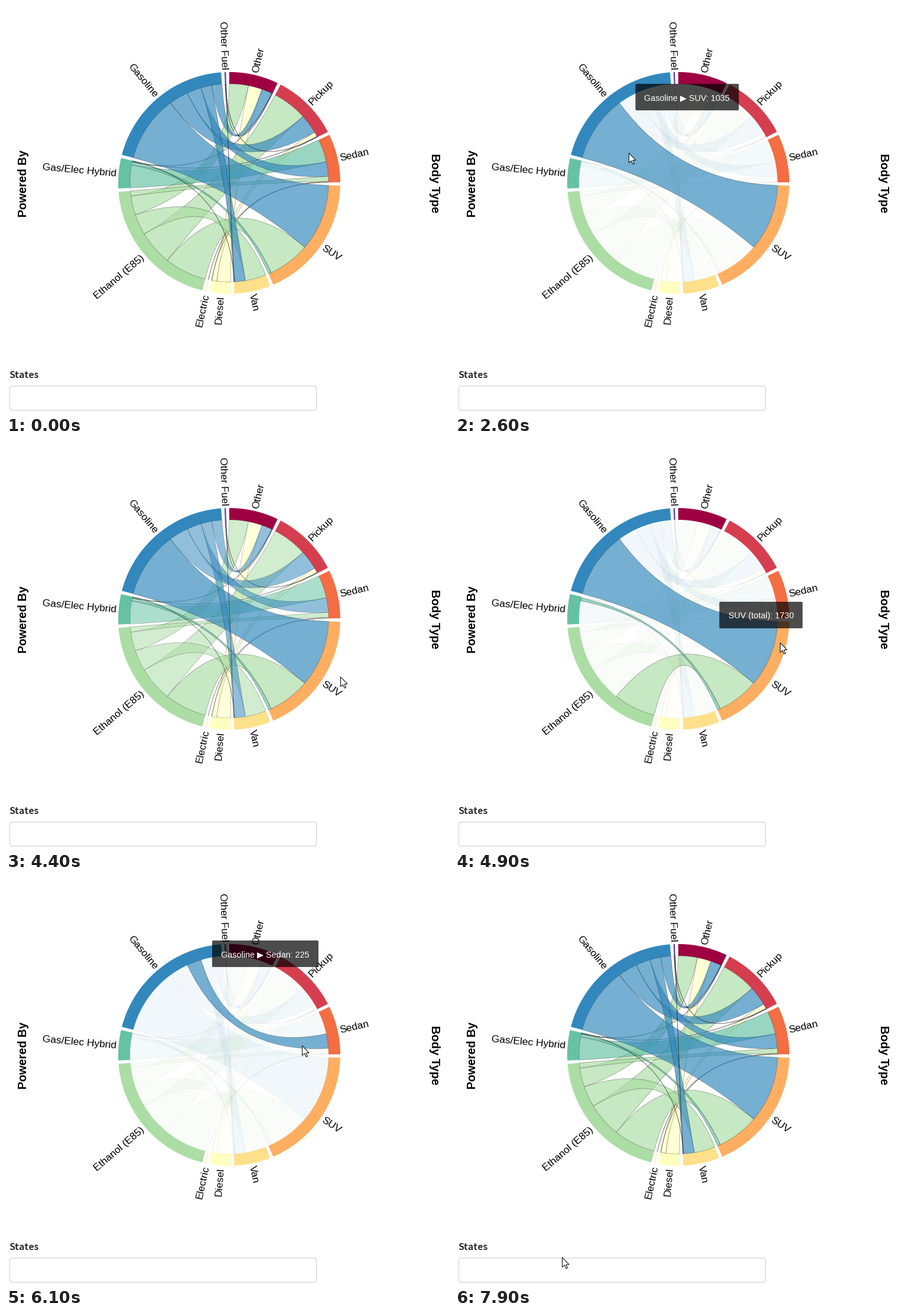
Animation of 750 by 692 pixels, one loop 8000 ms. Source, as a matplotlib script:

```python
from itertools import product

import numpy as np
import matplotlib.pyplot as plt
from matplotlib.animation import FuncAnimation
from matplotlib.patches import FancyBboxPatch, PathPatch, Polygon
from matplotlib.path import Path

WIDTH, HEIGHT, DPI = 750, 692, 64
PT = 72 / DPI  # points per pixel
FRAMES, STEP = 80, 100
CENTER = np.array([378, 300])
INNER, OUTER, LABEL_RADIUS = 168, 188, 192
PAD = 0.03
FADED, FADE_MS = 0.1, 250
SANS = ["Liberation Sans", "DejaVu Sans"]

BODIES = ["Other", "Pickup", "Sedan", "SUV", "Van"]
DIESEL, ELECTRIC, ETHANOL, HYBRID, GASOLINE, OTHER_FUEL = FUELS = [
    "Diesel", "Electric", "Ethanol (E85)", "Gas/Elec Hybrid", "Gasoline",
    "Other Fuel"]
NAMES = BODIES + FUELS
COLORS = dict(zip(NAMES, [
    "#9e0142", "#d53e4f", "#f46d43", "#fdae61", "#fee08b", "#ffffbf",
    "#fce38f", "#abdda4", "#66c2a5", "#3288bd", "#5e4fa2"]))

# Main flows per body; rare combinations share one small count.
MAIN = {
    "Other": {DIESEL: 215, ETHANOL: 295, GASOLINE: 160},
    "Pickup": {DIESEL: 75, ETHANOL: 540, GASOLINE: 300},
    "Sedan": {ETHANOL: 80, HYBRID: 355, GASOLINE: 225},
    "SUV": {ETHANOL: 650, HYBRID: 45, GASOLINE: 1035},
    "Van": {ETHANOL: 325, GASOLINE: 165},
}
RARE = {*product((HYBRID, OTHER_FUEL), ("Other", "Pickup", "Van")),
        *product((DIESEL, ELECTRIC), ("Sedan",))}
RARE_COUNT = 7

FLOWS = {}
for body, fuel in product(BODIES, FUELS):
    count = MAIN[body].get(fuel, RARE_COUNT if (fuel, body) in RARE else 0)
    if count:
        FLOWS[fuel, body] = count
TOTALS = {name: sum(n for pair, n in FLOWS.items() if name in pair)
          for name in NAMES}

# time, hovered group or chord, tooltip shown
HOVERS = [
    (1200, (GASOLINE,), True),
    (2150, (GASOLINE, "SUV"), True),
    (3620, (ETHANOL, "SUV"), True),
    (3900, ("SUV",), False),
    (4245, (), False),
    (4550, ("SUV",), True),
    (5350, (GASOLINE, "SUV"), True),
    (5800, (GASOLINE, "Sedan"), True),
    (6760, (GASOLINE, "SUV"), True),
    (6860, ("SUV",), True),
    (7190, (), False),
]

# start, end, destination of each pointer move; it rests in between
ENTRY = (228, 8)
MOVES = [
    (500, 1300, (238, 187)), (2050, 2600, (294, 249)),
    (2900, 3000, (294, 254)), (3100, 3700, (466, 403)),
    (3700, 4000, (530, 395)), (4200, 4400, (566, 398)),
    (4400, 4900, (550, 340)), (5300, 5500, (504, 305)),
    (5700, 6200, (500, 279)), (6600, 6900, (578, 466)),
    (7100, 7900, (181, 643)),
]
ARROW = np.array([(0, 0), (0, 16.5), (3.9, 13), (6.7, 19), (9, 18),
                  (6.4, 12.2), (11.5, 12)]) + 0.5


def polar(angle, radius):
    """Stage points for clockwise angles measured from the top."""
    angle = np.asarray(angle)
    unit = np.stack([np.sin(angle), -np.cos(angle)], axis=-1)
    return CENTER + radius * unit


def arc(span, radius):
    return polar(np.linspace(*span, 60), radius)


def layout():
    """Angular span of every group and of every chord end."""
    unit = (2 * np.pi - PAD * len(NAMES)) / (2 * sum(FLOWS.values()))
    groups, ends, angle = {}, {}, 0
    for name in NAMES:
        start = angle
        pairs = [pair for pair in FLOWS if name in pair]
        for pair in sorted(pairs, key=FLOWS.get, reverse=True):
            stop = angle + FLOWS[pair] * unit
            ends[name, pair] = (angle, stop)
            angle = stop
        groups[name] = (start, angle)
        angle += PAD
    return groups, ends


def ring_path(span):
    return Path(np.vstack([arc(span, OUTER), arc(span, INNER)[::-1]]))


def ribbon_path(first, second):
    a, b = arc(first, INNER), arc(second, INNER)
    points = np.vstack([a, CENTER, b, CENTER, a[0]])
    line, curve = Path.LINETO, Path.CURVE3
    codes = ([Path.MOVETO] + [line] * (len(a) - 1) + [curve] * 2
             + [line] * (len(b) - 1) + [curve] * 2)
    return Path(points, codes)


def put_text(x, y, text, size, **style):
    options = dict(family=SANS, color="black", va="baseline",
                   rotation_mode="anchor")
    return ax.text(x, y, text, fontsize=size * PT, **(options | style))


def put_box(x, y, width, height, radius, **style):
    shape = f"round,pad=0,rounding_size={radius}"
    return ax.add_patch(FancyBboxPatch((x, y), width, height,
                                       boxstyle=shape, **style))


def put_label(name, span, size=17.4):
    angle = np.mean(span)
    ux, uy = polar(angle, 1) - CENTER
    flipped = angle > np.pi
    side = -1 if flipped else 1
    x, y = polar(angle, LABEL_RADIUS) + 0.35 * size * side * np.array([-uy, ux])
    put_text(x, y, name, size, ha="right" if flipped else "left",
             rotation=(270 if flipped else 90) - np.degrees(angle))


def make_tip(target):
    if len(target) == 1:
        bounds = ring_path(groups[target[0]]).get_extents()
        message = f"{target[0]} (total): {TOTALS[target[0]]}"
    else:
        bounds = chords[target].get_path().get_extents()
        message = f"{target[0]} \u25b6 {target[1]}: {FLOWS[target]}"
    x = round((bounds.x0 + bounds.x1) / 2 + 12.5)
    bottom = round(min(bounds.y0, bounds.y1) + 12)
    text = put_text(x, bottom - 17, message, 14.4, color="white",
                    ha="center", zorder=11)
    width = round(text.get_window_extent(fig.canvas.get_renderer()).width) + 30
    box = put_box(x - width / 2, bottom - 45, width, 45, 2,
                  fc=(0, 0, 0, 0.7), ec="none", zorder=10)
    return box, text


def ease(p):
    p = min(max(p, 0), 1)
    return 4 * p ** 3 if p < 0.5 else 1 - 4 * (1 - p) ** 3


def chord_levels(t):
    """Opacity of each chord, replaying the hover transitions up to t."""
    level = goal = np.ones(len(FLOWS))
    since = 0
    for when, target, _ in HOVERS:
        if when > t:
            break
        level = level + (goal - level) * ease((when - since) / FADE_MS)
        goal = np.array([1 if set(target) <= set(pair) else FADED
                         for pair in FLOWS])
        since = when
    return level + (goal - level) * ease((t - since) / FADE_MS)


def paint_chords(levels):
    for (pair, patch), level in zip(chords.items(), levels):
        patch.set_facecolor((COLORS[pair[0]], 0.67 * level))
        patch.set_edgecolor((0, 0, 0, 0.45 * level))


def pointer_tip(t):
    place = np.array(ENTRY, float)
    for start, end, goal in MOVES:
        place += (goal - place) * np.clip((t - start) / (end - start), 0, 1)
    return np.round(place)


fig = plt.figure(figsize=(WIDTH / DPI, HEIGHT / DPI), dpi=DPI,
                 facecolor="white")
ax = fig.add_axes([0, 0, 1, 1])
ax.set(xlim=(0, WIDTH), ylim=(HEIGHT, 0))
ax.axis("off")

groups, ends = layout()
for name, span in groups.items():
    ax.add_patch(PathPatch(ring_path(span), fc=COLORS[name], lw=0, zorder=1))
    put_label(name, span)

chords = {}
for pair in FLOWS:
    path = ribbon_path(ends[pair[1], pair], ends[pair[0], pair])
    chords[pair] = ax.add_patch(PathPatch(path, lw=0.6 * PT, zorder=2))

put_text(35, 300.5, "Powered By", 20, weight="bold", ha="center", rotation=90)
put_text(720, 300.5, "Body Type", 20, weight="bold", ha="center", rotation=-90)
put_text(5.5, 631, "States", 16, weight="bold", color="#333333",
         family=["Noto Sans CJK JP", "DejaVu Sans"])
put_box(6.5, 644.5, 519, 41, 4, fc="white", ec="#cccccc", lw=PT)

tips = {}
for _, target, shown in HOVERS:
    if shown and target not in tips:
        tips[target] = make_tip(target)
pointer = ax.add_patch(Polygon(ARROW, fc="white", ec="black", lw=PT,
                               zorder=12))


def update(frame):
    t = frame * STEP
    paint_chords(chord_levels(t))

    past = [(target, shown) for when, target, shown in HOVERS if when <= t]
    current, shown = past[-1] if past else ((), False)
    for target, parts in tips.items():
        for part in parts:
            part.set_visible(shown and target == current)

    pointer.set_xy(ARROW + pointer_tip(t))
    pointer.set_visible(t >= MOVES[0][0])
    return []


animation = FuncAnimation(fig, update, frames=FRAMES, interval=STEP,
                          init_func=lambda: update(0), repeat=True,
                          repeat_delay=0)
plt.show()
```
